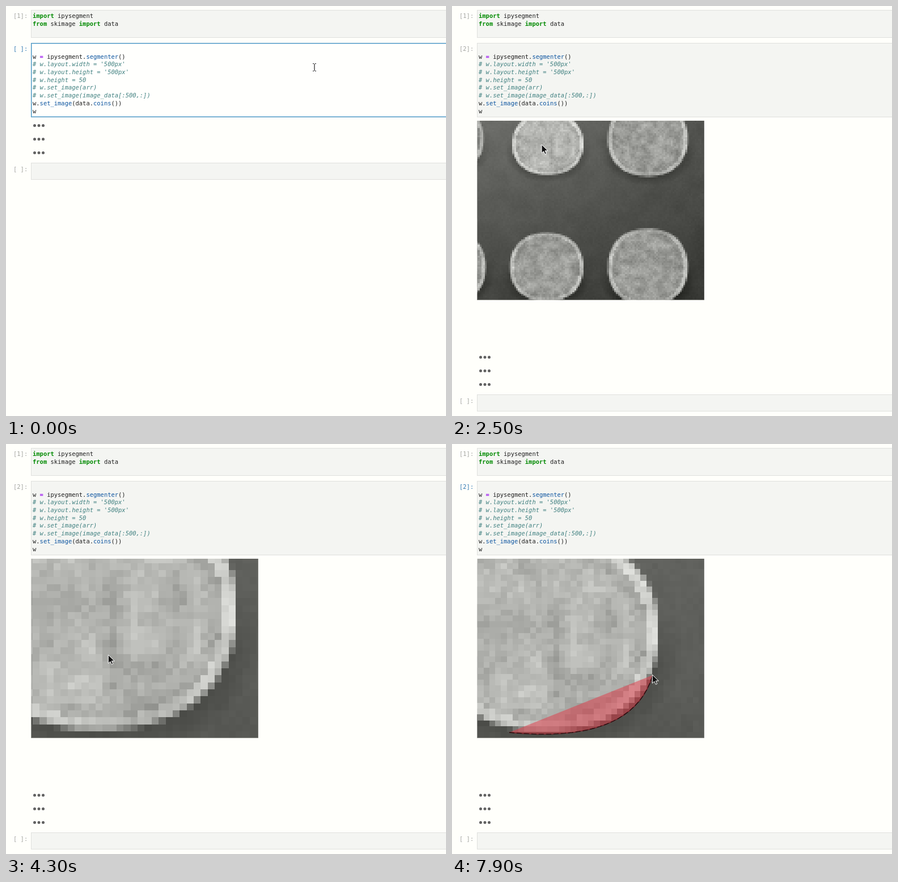
Write an HTML page with a canvas that moves like this. It is 776x722 px and loops after 8 s.

```html
<!DOCTYPE html>
<html lang="en">
<head>
<meta charset="utf-8">
<title>Notebook segmentation</title>
<style>
html, body { margin: 0; width: 100%; height: 100%; overflow: hidden; background: #fffffb; }
body { position: relative; font: 10.46px/13.7px "DejaVu Sans Mono", monospace; color: #212121; }
body > *, .tail > * { position: absolute; }
.cell { left: 44px; right: -4px; box-sizing: border-box; background: #f4f5f2; border: 1px solid #dfe0dd; }
.cell.active { background: #fffffd; border-color: #4d96c3; box-shadow: inset 0 0 0 1px #a9d0e6; }
pre { margin: 0; font: inherit; left: 47px; }
.prompt { left: 13px; color: #a3a4a1; white-space: pre; }
.prompt.blue { color: #2f78b2; }
b { color: #008a00; }
b.op { color: #a020f0; }
i { color: #408080; }
u { color: #0d55a0; text-decoration: none; }
canvas { left: 44px; top: 201px; }
.caret { left: 209px; top: 96px; width: 1px; height: 14px; background: #222; }
.tail { left: 0; top: 0; width: 100%; height: 0; }
.dots { left: 47.5px; width: 5px; height: 5px; border-radius: 50%; background: #616161;
  box-shadow: 7.5px 0 #616161, 15px 0 #616161; }
svg { left: 0; top: 0; overflow: visible; }
</style>
</head>
<body>
<div class="cell" style="top:7px;height:49px"></div>
<div class="prompt" style="top:11px">[1]:</div>
<pre style="top:11px"><b>import</b> ipysegment
<b>from</b> skimage <b>import</b> data</pre>

<div class="cell" id="cell" style="top:65px;height:131px"></div>
<div class="prompt" id="prompt" style="top:69px"></div>
<pre style="top:82.6px">w <b class="op">=</b> ipysegment.<u>segmenter</u>()
<i># w.layout.width = '500px'
# w.layout.height = '500px'
# w.height = 50
# w.set_image(arr)
# w.set_image(image_data[:500,:])</i>
w.<u>set_image</u>(data.<u>coins</u>())
w</pre>
<div class="caret" id="caret"></div>

<canvas id="view" width="402" height="318"></canvas>

<div class="tail" id="tail">
  <div class="dots" style="top:208.4px"></div>
  <div class="dots" style="top:232.4px"></div>
  <div class="dots" style="top:256.4px"></div>
  <div class="cell" style="top:276px;height:30px"></div>
  <div class="prompt" style="top:281px">[ ]:</div>
</div>

<svg width="20" height="20" id="cursor">
  <g id="beam" fill="none">
    <path d="M-3-6.5H3M-3 6.5H3M0-6.5V6.5" stroke="#fff" stroke-width="3"/>
    <path d="M-3-6.5H-.8M.8-6.5H3M-3 6.5H-.8M.8 6.5H3M0-6V6" stroke="#222" stroke-width="1.2"/>
  </g>
  <path id="arrow" transform="translate(-.7 -.7)" fill="#111" stroke="#fff"
    d="M0 0V15L3.6 11.8 6 17 8.4 16 6.1 10.8H11Z"/>
</svg>

<script>
const $ = id => document.getElementById(id);
const W = 384, H = 303, LOOP = 8000, STEP = 100;
const DRAW_START = 5800, DRAW_END = 7900;
const ANCHOR = [110, 67]; // picture point whose stage position the view keys give

const clamp = (v, a, b) => Math.min(b, Math.max(a, v));
const mix = (a, b, u) => a + (b - a) * u;
const rand = (x, y) => {
  const v = Math.sin(x * 127.1 + y * 311.7) * 43758.5453;
  return v - Math.floor(v);
};
function smooth(x, y, size) {
  x /= size; y /= size;
  const i = Math.floor(x), j = Math.floor(y), u = x - i, v = y - j;
  return mix(mix(rand(i, j), rand(i + 1, j), u), mix(rand(i, j + 1), rand(i + 1, j + 1), u), v) - .5;
}

// Four rows of six coins, growing and spreading to the right
function makeCoin(col, row) {
  const r = 19.2 + col * .75 + rand(col, row) * 1.5;
  return {
    x: 36 + 53 * col + .85 * col * col, y: 47 + 70.3 * row,
    rx: r, ry: r * mix(.93, 1, rand(row, col)), tone: mix(135, 162, rand(col + 9, row))
  };
}
const coins = Array.from({ length: 24 }, (_, i) => makeCoin(i % 6, Math.floor(i / 6)));
coins[1] = { x: 90.5, y: 49.8, rx: 19.5, ry: 16.9, tone: 178 }; // the coin being outlined

function shade(x, y) {
  const px = x + .5, py = y + .5, grain = rand(x, y) - .5;
  let v = 30 + 86 * Math.exp(-((px / 260) ** 2) - (py / 150) ** 2);
  v += grain * 5 + smooth(x, y, 6) * 8;
  for (const coin of coins) {
    const dx = Math.abs(px - coin.x) / coin.rx, dy = (py - coin.y) / coin.ry;
    if (dx > 1.3 || Math.abs(dy) > 1.3) continue;
    const d = (dx ** 2.25 + Math.abs(dy) ** 2.25) ** (1 / 2.25);
    if (d > 1 && d < 1.25) v -= clamp(dy + .3, 0, 1) * (1.25 - d) * 80;
    let c = coin.tone + grain * 20 + smooth(x + 40, y, 3) * 40;
    if (d > .9) c += 8 + 28 * dx;
    else if (d > .78) c -= 6;
    v = mix(v, c, clamp((1 - d) * coin.rx + .5, 0, 1));
  }
  return clamp(v, 20, 238);
}

function makePicture() {
  const c = document.createElement('canvas');
  c.width = W; c.height = H;
  const g = c.getContext('2d'), img = g.createImageData(W, H);
  for (let i = 0; i < W * H; i++) {
    const v = shade(i % W, Math.floor(i / W));
    img.data.set([v, v + 1, v - 3, 255], i * 4);
  }
  g.putImageData(img, 0, 0);
  return c;
}

// time, scale, stage position of the anchor
const viewKeys = [
  [1500, 1.0417, 159, 272], [2000, 1.7, 181, 279], [2200, 1.7, 181, 279],
  [2600, 3.97, 257, 308], [3000, 3.97, 257, 421], [3800, 11.35, 407, 389],
  [4300, 12.35, 405, 506], [5300, 10.25, 363, 507]
];
// time, pointer position
const cursorKeys = [
  [1100, 544, 108], [1200, 697, 75], [1400, 251, 277], [1500, 251, 277],
  [1700, 125, 259], [2200, 125, 259], [2600, 170, 240], [3000, 170, 353],
  [3800, 127, 397], [4300, 181, 372], [5300, 101, 501], [5500, 101, 501], [5700, 101, 508]
];

function span(keys, t) {
  const i = keys.findIndex(k => k[0] > t);
  if (i === 0) return [keys[0], keys[0], 0];
  if (i < 0) return [keys.at(-1), keys.at(-1), 0];
  const a = keys[i - 1], b = keys[i];
  return [a, b, (t - a[0]) / (b[0] - a[0])];
}

function viewAt(t) {
  const [a, b, u] = span(viewKeys, t);
  const s = a[1] * (b[1] / a[1]) ** u;
  // zooming keeps one stage point fixed, so position follows scale
  const p = a[1] === b[1] ? u : (s - a[1]) / (b[1] - a[1]);
  return [s, mix(a[2], b[2], p), mix(a[3], b[3], p)];
}

// The hand-drawn edge is one cubic curve, traced with a slow start
const bezier = (a, b, c, d, u) =>
  a * (1 - u) ** 3 + 3 * b * u * (1 - u) ** 2 + 3 * c * u * u * (1 - u) + d * u ** 3;
const edge = u => [bezier(101, 190, 322, 354, u), bezier(508, 516, 515, 407, u)];
const traced = t => clamp((t - DRAW_START) / (DRAW_END - DRAW_START), 0, 1) ** 1.2;

function pointerAt(t) {
  if (t >= DRAW_START) return edge(traced(t));
  const [a, b, u] = span(cursorKeys, t);
  return [mix(a[1], b[1], u), mix(a[2], b[2], u)];
}

const picture = makePicture();
const ctx = $('view').getContext('2d');
ctx.translate(-44, -201);
ctx.beginPath();
ctx.rect(44.5, 202, 400.3, 315.4);
ctx.clip();
ctx.imageSmoothingEnabled = false;

function drawView(t) {
  const [s, ax, ay] = viewAt(t);
  ctx.clearRect(44, 201, 402, 318);
  ctx.drawImage(picture, ax - ANCHOR[0] * s, ay - ANCHOR[1] * s, W * s, H * s);
  if (t > DRAW_START) drawOutline(traced(t));
}

function drawOutline(end) {
  const parts = 24;
  ctx.beginPath();
  for (let i = 0; i <= parts; i++) ctx.lineTo(...edge(end * i / parts));
  ctx.fillStyle = 'rgba(225, 62, 75, .52)';
  ctx.fill();
  ctx.lineWidth = 1.3;
  ctx.setLineDash([]);
  ctx.strokeStyle = '#701820';
  ctx.stroke();
  ctx.setLineDash([9, 4]);
  ctx.strokeStyle = '#240c0e';
  ctx.stroke();
}

const show = (id, on) => { $(id).style.display = on ? '' : 'none'; };

function render(t) {
  const done = t >= 800;
  $('cell').classList.toggle('active', t < 600);
  $('prompt').textContent = t < 600 ? '[ ]:' : t < 900 ? '[*]:' : '[2]:';
  $('prompt').classList.toggle('blue', t < 600 || t >= 5900);
  show('caret', t >= 200 && t < 600);
  show('view', done);
  $('tail').style.transform = done ? 'translateY(408px)' : '';
  if (done) drawView(t);
  show('beam', t <= 1300);
  show('arrow', t > 1300);
  const [x, y] = pointerAt(t);
  $('cursor').style.transform = `translate(${x}px, ${y}px)`;
}

let last = -1;
function tick() {
  const t = Math.floor(performance.now() % LOOP / STEP) * STEP;
  if (t !== last) render(last = t);
  requestAnimationFrame(tick);
}
tick();
</script>
</body>
</html>
```
